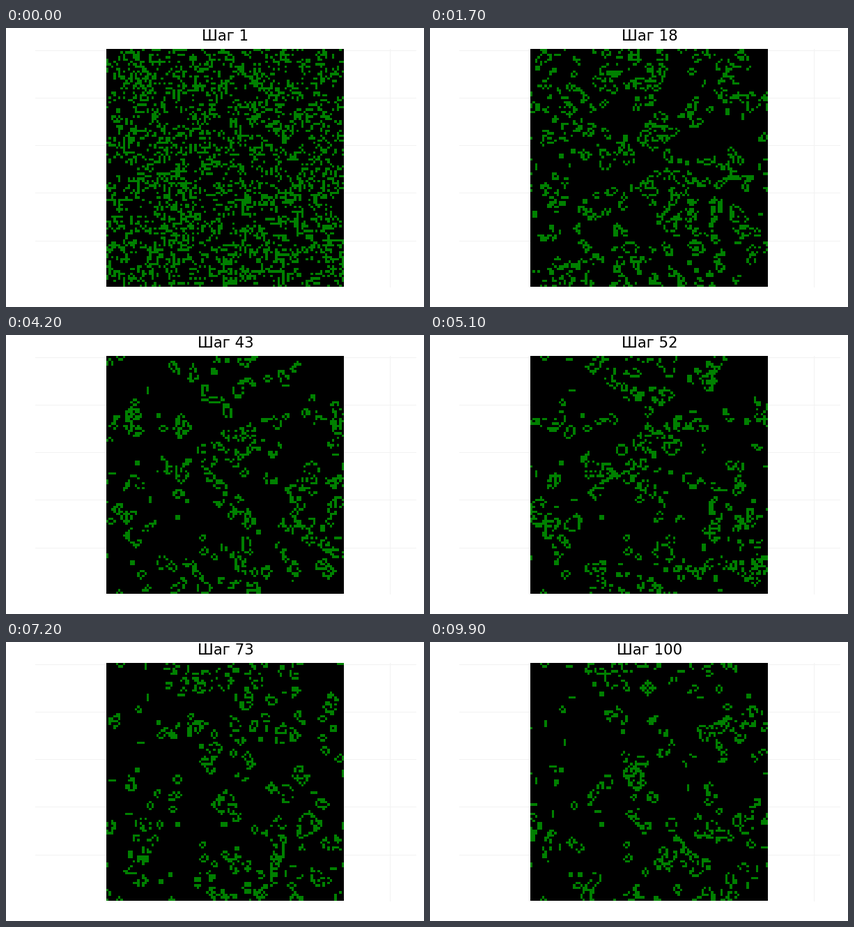
A matplotlib script for the animation above (10 s loop, 600 px wide and 400 px high).

```python
import numpy as np
import matplotlib.pyplot as plt
from matplotlib.animation import FuncAnimation
from matplotlib.colors import ListedColormap

W, H, DPI = 600, 400, 100
N, STEPS = 100, 100
LEFT, TOP, SIDE = 144, 30, 341
CELL = SIDE / N


def evolve(grid):
    """One Game of Life generation on a torus."""
    near = sum(np.roll(grid, (dy, dx), (0, 1))
               for dy in (-1, 0, 1) for dx in (-1, 0, 1)) - grid
    return ((near == 3) | ((near == 2) & (grid == 1))).astype(int)


def simulate(seed):
    grid = np.random.default_rng(seed).integers(0, 2, (N, N))
    states = []
    for _ in range(STEPS):
        grid = evolve(grid)
        states.append(grid)
    return states


states = simulate(7)

plt.rcParams["font.family"] = "DejaVu Sans"
fig = plt.figure(figsize=(W / DPI, H / DPI), dpi=DPI, facecolor="white")
ax = fig.add_axes([0, 0, 1, 1])
ax.axis("off")

# Faint grid lines at every 20 rows, and at columns 0 and 120
line = dict(color="#f2f2f2", lw=72 / DPI, zorder=0)
for row in range(20, N + 1, 20):
    y = TOP + (N + 0.5 - row) * CELL
    ax.plot([42, 588], [y, y], **line)
for col in (0, 120):
    x = LEFT + (col - 0.5) * CELL
    ax.plot([x, x], [TOP, TOP + SIDE], **line)

board = ax.imshow(states[0], cmap=ListedColormap(["black", "green"]),
                  vmin=0, vmax=1, interpolation="nearest", aspect="auto",
                  extent=(LEFT, LEFT + SIDE, TOP + SIDE, TOP), zorder=1)
title = ax.text(LEFT + SIDE / 2 + 0.5, 18.4, "", ha="center", va="baseline",
                fontsize=21.3 * 72 / DPI, color="black")
ax.set_xlim(0, W)
ax.set_ylim(H, 0)


def update(i):
    board.set_data(states[i])
    title.set_text(f"Шаг {i + 1}")
    return board, title


anim = FuncAnimation(fig, update, frames=STEPS, interval=100,
                     repeat=True, repeat_delay=0)
plt.show()
```
